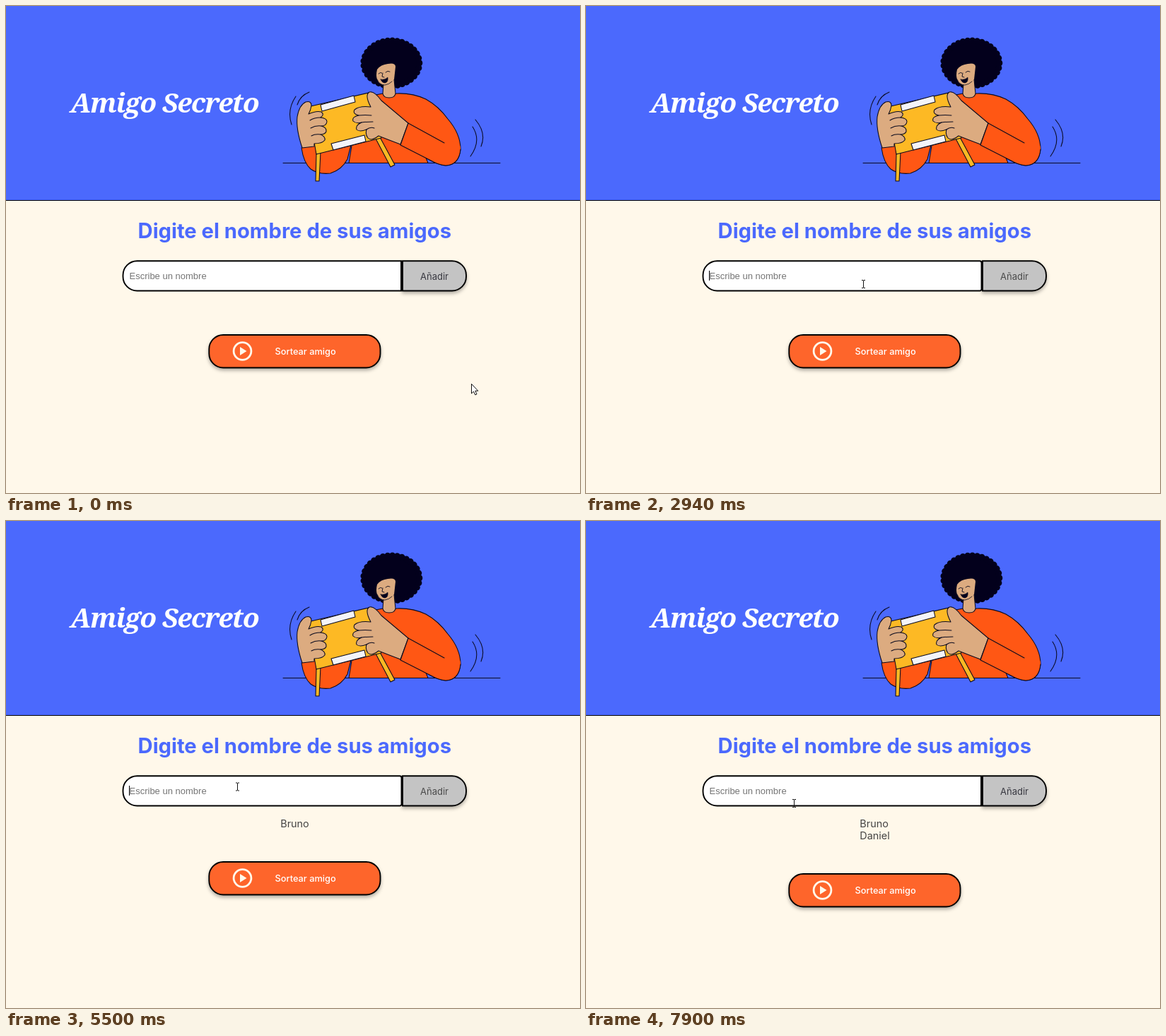
Recreate the animation shown at these times as an HTML page. Size 812 by 690 pixels, loop 8000 ms.

```html
<!DOCTYPE html>
<html lang="es">
<head>
<meta charset="utf-8">
<title>Amigo Secreto</title>
<style>
  html, body { margin: 0; width: 100%; height: 100%; overflow: hidden; background: #fff8ea; }
  svg { display: block; }
  text { font-family: Inter, "Liberation Sans", sans-serif; font-size: 13px; font-optical-sizing: none; }
  .title { font: italic 800 39px "Noto Serif", "Liberation Serif", serif; letter-spacing: -1.35px; fill: #fff; }
  .heading { font-size: 29.2px; font-weight: 700; fill: #4b69fd; text-anchor: middle; }
  .field { font: 13px "Liberation Sans", Arial, sans-serif; }
  .names text { font-size: 14.4px; fill: #444; }
  .call { font-size: 12.8px; font-weight: 500; fill: #fff; }
  .raised { filter: drop-shadow(0 3px 2.5px rgba(0, 0, 0, .3)); }
  .box { stroke: #000; stroke-width: 1.9; }
  .art { stroke: #0a0a1e; stroke-width: 1.05; stroke-linejoin: round; stroke-linecap: round; fill: none; }
  .skin { fill: #dcab80; }
  .wool { fill: #ff5714; }
  .wood { fill: #fdb924; }
  .paper { fill: #f4f4f8; }
  .hair { fill: #03001c; }
</style>
</head>
<body>
<svg width="812" height="690" viewBox="0 0 812 690">
  <rect width="812" height="275" fill="#4b69fd"/>
  <rect y="275" width="812" height="1" fill="#000"/>
  <text class="title" x="91" y="150.5">Amigo Secreto</text>

  <g class="art">
    <path d="M392 222.5H699"/>
    <!-- hair with a curly rim -->
    <ellipse class="hair" cx="545.3" cy="81" rx="40" ry="32.5" stroke="none"/>
    <ellipse cx="545.3" cy="81" rx="39.5" ry="32" stroke="#03001c" stroke-width="9" stroke-dasharray="0 6.8"/>
    <!-- torso, neck and face -->
    <path class="wool" d="M485 222.5L492 180L518 127L533 124Q541 130 552 124Q575 123 594 132Q612 142 625 160Q643 181 643 203Q641 225 622 226Q610 225 594 215L597 222.5Z"/>
    <path class="skin" d="M534 110L533 124Q534 130 542 130Q550 130 551 124L549 104Z"/>
    <path class="skin" d="M525 90Q530 83 540 82Q551 80 551 86L549 104Q544 111 536 112Q528 112 525 104Q523 98 525 90Z" stroke="none"/>
    <path d="M525 104Q528 112 536 112Q542 111 546 107" stroke-width=".8"/>
    <path d="M527 96Q530 93 532 95M537 94Q540 91 543 93M533 95L532 100L535 101" stroke-width=".9"/>
    <path class="hair" d="M530 104Q536 105 540 101Q541 108 536 109Q532 109 530 104Z" stroke-width=".6"/>
    <!-- left sleeve -->
    <path class="wool" d="M418 201Q421 222 431 231Q442 239 459 237Q475 232 483 217L488 197L440 194Z"/>
    <!-- box with its legs -->
    <path class="wood" d="M439 209L445 207L443 248H438Z"/>
    <path class="wood" d="M523 188L529 186L550 225L544 228Z"/>
    <path class="wood" d="M427 143L517 122L531 187L439 210Z"/>
    <path class="paper" d="M445 140L492 127L494 136L447 149Z"/>
    <path class="paper" d="M460 195L507 183L509 192L463 204Z"/>
    <!-- left hand -->
    <path class="skin" d="M419 201Q410 174 412 157Q415 140 424 136Q432 134 432 141Q431 148 428 153Q439 148 446 150Q451 154 445 158Q454 159 454 164Q453 170 446 170Q454 172 453 178Q451 182 445 182Q452 185 451 190Q447 195 436 195V199Z"/>
    <path d="M445 158Q436 158 430 162M446 170Q438 169 431 173M445 182Q437 181 432 184"/>
    <!-- right hand -->
    <path class="skin" d="M569 166L531 134Q521 120 514 122Q507 126 516 143Q500 141 493 147Q490 153 499 155Q489 157 491 163Q495 167 503 165Q494 169 496 175Q500 179 510 175Q508 182 512 187Q517 192 527 184Q542 190 558 196Z"/>
    <path d="M499 155Q508 154 517 155M503 165Q510 164 519 164M510 175Q515 171 521 173"/>
    <!-- right forearm -->
    <path class="wool" d="M569 166L620 194Q643 186 643 203Q641 225 622 226Q612 225 603 220L558 197Z" stroke="none"/>
    <path d="M620 194L569 166L558 197L603 220Q612 225 622 226Q641 225 643 203"/>
    <!-- shake marks -->
    <path d="M410 128Q397 147 404 168M429 122Q416 127 412 140M660 171Q673 191 657 213M664 161Q680 180 672 199"/>
  </g>

  <text class="heading" x="408.3" y="329">Digite el nombre de sus amigos</text>

  <path id="add" class="box raised" d="M561 361.2H631a20 20 0 0 1 20 20v2.3a20 20 0 0 1 -20 20H561Z"/>
  <text id="addText" x="606" y="387.5" text-anchor="middle">Añadir</text>
  <path id="input" class="box" fill="#fff"/>
  <text id="value" class="field" x="174.5" y="386.5"></text>
  <rect id="caret" y="375" width="1" height="14"/>

  <g class="names">
    <text id="name0" y="434">Bruno</text>
    <text id="name1" y="451">Daniel</text>
  </g>

  <g id="draw">
    <rect id="drawBox" class="box raised" x="287.3" y="466" width="242.2" height="46.5" rx="20"/>
    <circle cx="334.5" cy="489" r="12.4" fill="none" stroke="#fff9eb" stroke-width="2.8"/>
    <path d="M331 483L340.5 489L331 495Z" fill="#fff9eb"/>
    <text class="call" x="380.5" y="493.5">Sortear amigo</text>
  </g>

  <g id="pointer">
    <path id="arrow" d="M.5 .5V14L3.5 11.2L5.8 16L8 15L5.8 10.3H9.8Z" fill="#fff" stroke="#111" stroke-width="1"/>
    <path id="beam" d="M-2.5 -5.5H-.5L0 -5L.5 -5.5H2.5M0 -5V5M-2.5 5.5H-.5L0 5L.5 5.5H2.5" fill="none" stroke="#111" stroke-width="1"/>
    <path id="hand" d="M-1 .8Q.5 -1 2 .8V5Q4 4 4.8 5.6Q6.6 5 7.2 6.6Q9.2 6.2 9.4 8V11.5Q9 14 7.6 17H-.6Q-2 14 -4.4 10.4Q-4.4 8 -2.4 8.8L-1 10.2Z" fill="#fff" stroke="#222" stroke-width="1"/>
  </g>
</svg>
<script>
const LOOP = 8000, TICK = 200 / 3, MID = 408.5;
const el = id => document.getElementById(id);
const show = (node, on) => node.setAttribute("visibility", on ? "visible" : "hidden");

// time, x, y of the pointer's hot spot
const path = [
  [0, 658, 535], [135, 658, 535], [330, 597, 534], [470, 597, 534],
  [670, 572, 589], [870, 458, 565], [1200, 408, 495], [1475, 408, 495],
  [1600, 396.5, 407], [1800, 392.5, 394], [4025, 392.5, 394],
  [4333, 400, 411], [4400, 520, 440], [4467, 590, 491], [4600, 719, 400],
  [4667, 720, 309], [4800, 605, 384], [4990, 605, 384], [5400, 327.5, 376.5],
  [7033, 327.5, 376.5], [7190, 605, 384], [7500, 605, 384],
  [7860, 294.5, 400], [LOOP, 294.5, 400]
];
const first = "Bruno", second = "Daniel";
// time, word, number of letters typed
const typing = [
  [0, ""], [3070, first, 1], [3290, first, 2], [3360, first, 3], [3560, first, 4], [3690, first, 5],
  [4960, ""], [5840, second, 1], [6040, second, 2], [6240, second, 3],
  [6370, second, 4], [6510, second, 5], [6700, second, 6], [7460, ""]
];
const focus = [[0, false], [1880, true], [4867, false], [5310, true], [7380, false]];
const blink = [[0, false], [1880, true], [2410, false], [2940, true], [4220, false], [5310, true], [7230, false]];
const added = [[0, 0], [4960, 1], [7460, 2]];

const step = (table, t) => table.findLast(row => row[0] <= t);

function pointerAt(t) {
  const i = Math.max(1, path.findIndex(p => p[0] > t));
  const [t0, x0, y0] = path[i - 1], [t1, x1, y1] = path[i];
  const k = (t - t0) / (t1 - t0);
  return [x0 + (x1 - x0) * k, y0 + (y1 - y0) * k];
}

const inside = (x, y, l, t, r, b) => x >= l && x < r && y >= t && y < b;

function inputShape(focused) {
  const left = "H185.5a20 20 0 0 0 -20 20v2.3a20 20 0 0 0 20 20";
  return focused
    ? `M557 361.2${left}H557q2.5 0 2.5 -2.5V363.7q0 -2.5 -2.5 -2.5Z`
    : `M559 361.2${left}H559Z`;
}

function placeNames(count) {
  const names = [el("name0"), el("name1")];
  const widths = names.slice(0, count).map(n => n.getComputedTextLength());
  const x = MID - Math.max(0, ...widths) / 2;
  names.forEach((n, i) => {
    n.setAttribute("x", x);
    show(n, i < count);
  });
}

function render(t) {
  const count = step(added, t)[1];
  const [, word, letters = 0] = step(typing, t);
  const text = word.slice(0, letters);
  const focused = step(focus, t)[1];
  const shift = 17 * count;

  const value = el("value");
  value.textContent = text || "Escribe un nombre";
  value.setAttribute("fill", text ? "#000" : "#757575");
  el("caret").setAttribute("x", 174 + (text ? Math.round(value.getComputedTextLength()) : 0));
  show(el("caret"), focused && step(blink, t)[1]);
  el("input").setAttribute("d", inputShape(focused));
  el("addText").setAttribute("fill", focused ? "#4a4a4a" : "#383840");

  placeNames(count);
  el("draw").setAttribute("transform", `translate(0 ${shift})`);

  const [x, y] = pointerAt(Math.floor(t / TICK + .05) * TICK);
  const onAdd = inside(x, y, 561, 361, 652, 405);
  const onDraw = inside(x, y, 287, 465 + shift, 530, 513 + shift);
  const onInput = inside(x, y, 165, 361, 561, 405);
  el("add").setAttribute("fill", onAdd ? "#a1a1a1" : "#c4c4c4");
  el("drawBox").setAttribute("fill", onDraw ? "#e55720" : "#fe652b");
  el("pointer").setAttribute("transform", `translate(${x} ${y})`);
  show(el("hand"), onAdd || onDraw);
  show(el("beam"), onInput);
  show(el("arrow"), !(onAdd || onDraw || onInput));
}

const start = performance.now();
function frame() {
  render((performance.now() - start) % LOOP);
  requestAnimationFrame(frame);
}
frame();
</script>
</body>
</html>
```
